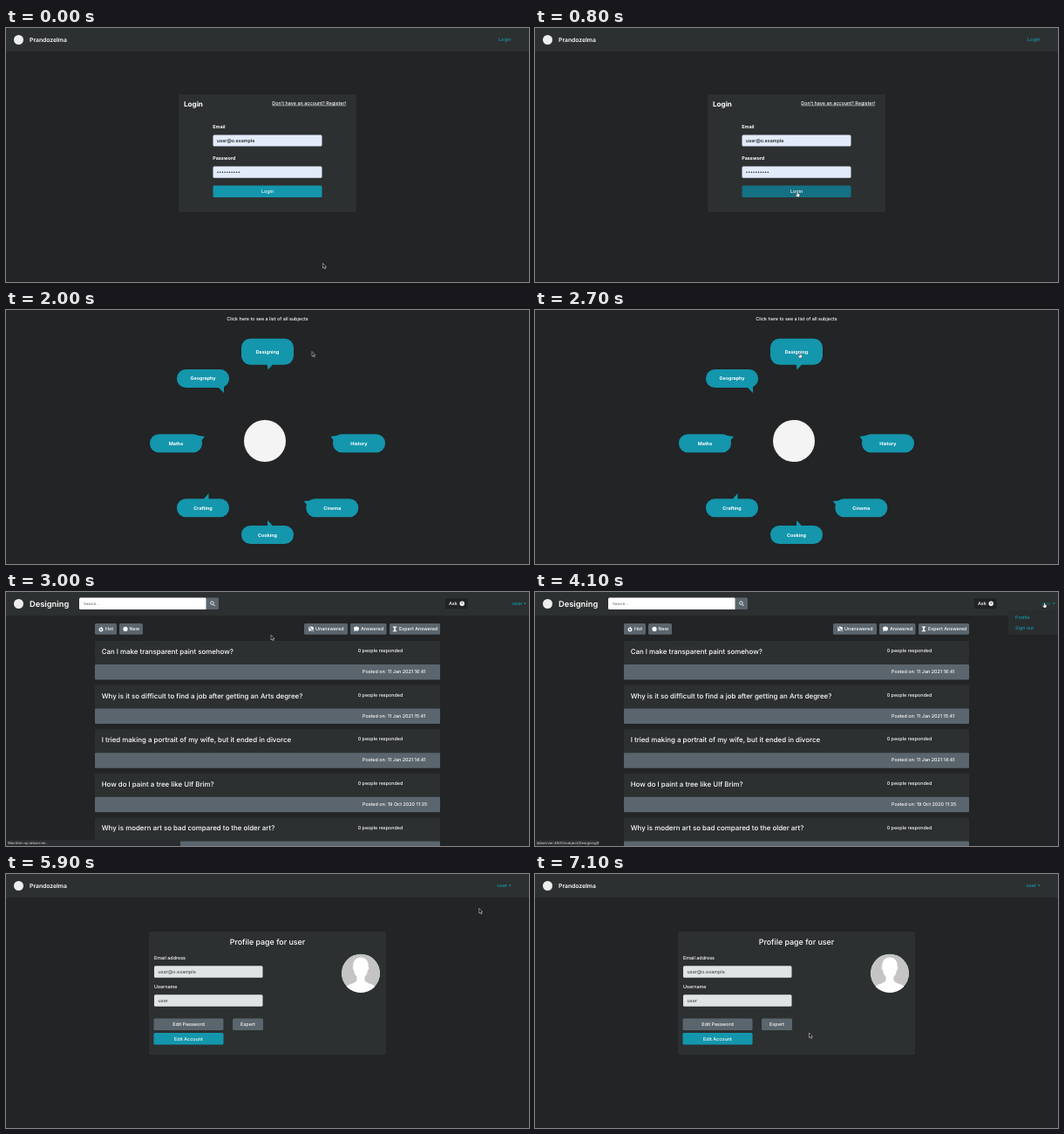
Recreate the animation shown at these times as an HTML page. Size 600 px wide and 291 px high, loop 8000 ms.

```html
<!DOCTYPE html>
<html lang="en">
<head>
<meta charset="utf-8">
<title>Subjects demo</title>
<style>
html, body { margin: 0; width: 100%; height: 100%; overflow: hidden; background: #222425; }
svg { display: block; width: 100vw; height: 100vh; font-family: Inter, "Open Sans", sans-serif; }
text { white-space: pre; font-weight: 500; text-rendering: geometricPrecision; }
</style>
</head>
<body>
<svg id="stage" viewBox="0 0 600 291"></svg>
<script>
const TEAL = '#1496ad', GRAY = '#5b656d', PANEL = '#2c3030', WHITE = '#fff', LINK = '#1398ae';
const MAIL = 'user@o.example', HOST = 'labserver';

// x, vertical centre, string, size, extra attributes
const text = (x, y, s, size = 5.4, extra = '') =>
  `<text x="${x}" y="${y + size * .36}" font-size="${size}" fill="${WHITE}" ${extra}>${s}</text>`;
const rect = (x, y, w, h, fill, r = 0, extra = '') =>
  `<rect x="${x}" y="${y}" width="${w}" height="${h}" rx="${r}" fill="${fill}" ${extra}/>`;
const circle = (x, y, r, fill, extra = '') => `<circle cx="${x}" cy="${y}" r="${r}" fill="${fill}" ${extra}/>`;
const path = (d, fill = WHITE, extra = '') => `<path d="${d}" fill="${fill}" ${extra}/>`;
const group = (id, body) => `<g id="${id}">${body}</g>`;
const bold = 'style="font-weight:700"', mid = 'text-anchor="middle"';
const tint = c => `style="fill:${c}"`;
const button = (x, y, w, h, label, fill, id = '') =>
  rect(x, y, w, h, fill, 1.5, id && `id="${id}"`) + text(x + w / 2, y + h / 2, label, 5.4, mid);

const nav = (title, size) => rect(0, 0, 600, 27, PANEL) + circle(14.5, 13.5, 5.5, '#eee') +
  text(27, 13.4, title, size, 'style="font-weight:600"');
const userMenu = (x, id) => text(x, 13.3, 'user', 5.6, `id="${id}" ${tint(LINK)}`) +
  path(`M${x + 13.3} 12.6h3l-1.5 1.7z`, LINK);

function login() {
  let dots = '';
  for (let i = 0; i < 10; i++) dots += circle(243 + i * 2.7, 165.2, .8, '#222');
  const field = y => rect(237.5, y, 125, 13.2, '#e2ebfa', 1.5);
  return nav('Prandozelma', 6.8) + text(565, 13.5, 'Login', 5.5, tint(LINK)) +
    rect(198, 76, 204, 135, PANEL, 1) + text(204, 86.6, 'Login', 8.1, bold) +
    text(305.3, 85.7, 'Don\'t have an account? Register!', 5.4, 'text-decoration="underline"') +
    text(237.3, 113, 'Email', 5.4, bold) + field(122.4) + text(242, 129, MAIL, 5.4, tint('#111')) +
    text(237.3, 149, 'Password', 5.4, bold) + field(158.5) + dots +
    button(237.5, 180.5, 125, 13.4, 'Login', TEAL, 'submit');
}

function subjects() {
  const bubbles = [
    ['Designing', 300, 47.8, 30, 'M299.5 61H307.5L300.5 68.5z'],
    ['Geography', 226, 78.5, 21, 'M243 88L250 86V95z'],
    ['Maths', 195, 152.7, 21, 'M215 143L228 145L223 151z'],
    ['Crafting', 226, 226.8, 21, 'M225.5 218H232.5V210z'],
    ['Cooking', 300, 257.6, 21, 'M300 249H307.5L300 241z'],
    ['Cinema', 374.3, 226.8, 21, 'M354 218L341.5 219L347 225z'],
    ['History', 405, 152.7, 21, 'M385 143L372.5 145L377 151z']
  ];
  return text(300, 10, 'Click here to see a list of all subjects', 5.4, mid) + circle(297, 150, 24, '#f4f4f4') +
    bubbles.map(([name, x, y, h, tail]) => rect(x - 30, y - h / 2, 60, h, TEAL, 10.3) + path(tail, TEAL) +
      text(x, y, name, 5.4, bold + ' ' + mid)).join('');
}

function questions() {
  const cards = [
    ['Can I make transparent paint somehow?', '11 Jan 2021 16:41'],
    ['Why is it so difficult to find a job after getting an Arts degree?', '11 Jan 2021 15:41'],
    ['I tried making a portrait of my wife, but it ended in divorce', '11 Jan 2021 14:41'],
    ['How do I paint a tree like Ulf Brim?', '19 Oct 2020 11:35'],
    ['Why is modern art so bad compared to the older art?', '19 Oct 2020 10:35']
  ];
  const filters = [[102, 25, 'Hot', 114], [130, 27, 'New', 141.5], [342, 50, 'Unanswered', 355],
    [395, 41.5, 'Answered', 407], [440, 58, 'Expert Answered', 451]];
  const comment = x => path(`M${x - 3} 42c0-3.2 6-3.2 6 0s-3 2.7-4 2.2l-2 1 .7-1.8z`);
  const slash = (color, width) => path('M346.7 39.5l6.6 5.8', 'none', `stroke="${color}" stroke-width="${width}"`);
  const icons = path('M109 39.3c.4 1.5 2.5 2.1 2.5 3.8a2.5 2.4 0 0 1-5 0c0-1 .6-1.6 1-2.1l.7 1z') +
    circle(109, 43.3, 1, GRAY) + circle(137, 42.4, 2.6, WHITE) +
    comment(350) + slash(GRAY, 1.4) + slash(WHITE, .6) + comment(402) +
    path('M443.7 39.5h4.6v.8h-.6l-1.2 2.1 1.2 2.1h.6v.8h-4.6v-.8h.6l1.2-2.1-1.2-2.1h-.6z');
  return nav('Designing', 9.3) +
    rect(84, 6.5, 146, 13.5, WHITE, 1.5) + text(89, 13.5, 'Search...', 4.3, tint('#6c757d')) +
    rect(229.5, 6.5, 14.5, 13.5, GRAY, 1.5) +
    path('M237.8 14.2l1.8 1.8', 'none', 'stroke="#fff" stroke-width="1"') +
    circle(236.4, 12.6, 1.8, 'none', 'stroke="#fff" stroke-width=".8"') +
    rect(503, 6.5, 27.5, 13.5, '#212426', 1.5, 'stroke="#41474b" stroke-width=".4"') +
    text(508, 13.3, 'Ask') + circle(523.2, 13.2, 2.7, WHITE) +
    text(523.2, 13.3, '?', 4.4, `${mid} ${tint('#212426')}`) + userMenu(580.5, 'listUser') +
    filters.map(([x, w, label, tx]) => rect(x, 36, w, 12.7, GRAY, 1.5) + text(tx, 42.5, label)).join('') + icons +
    cards.map(([title, date], i) => `<g transform="translate(0 ${50.6 * i})">` +
      rect(102, 56, 396, 27, PANEL, 1) + rect(102, 83, 396, 17.5, GRAY, 1) +
      text(109.7, 68.2, title, 7.9) + text(403.7, 67.3, '0 people responded') +
      text(409, 91.2, 'Posted on: ' + date) + '</g>').join('') +
    group('menu', rect(543, 21, 57, 28, '#292d2e', 1) + text(551, 29.5, 'Profile', 5.4, tint(LINK)) +
      text(551, 41, 'Sign out', 5.4, tint(LINK)));
}

function profile() {
  const field = y => rect(170, y, 124.5, 13.6, '#e1e4e5', 1.5);
  return nav('Prandozelma', 6.8) + userMenu(563.3, 'profileUser') + rect(164, 66, 272, 141, PANEL, 1) +
    text(300, 77.3, 'Profile page for', 8.9, `id="heading" ${mid}`) +
    text(170, 96, 'Email address') + field(105.2) + text(170, 128.6, 'Username') + field(138.2) +
    group('values', text(174.5, 112.2, MAIL, 5.4, tint('#495057')) + text(174.5, 145, 'user', 5.4, tint('#495057'))) +
    button(169.5, 165.5, 80, 13.5, 'Edit Password', GRAY) + button(260, 165.5, 35, 13.5, 'Expert', GRAY) +
    button(169.5, 182, 80, 13.5, 'Edit Account', TEAL) +
    '<clipPath id="round"><circle cx="407" cy="113.7" r="22.3"/></clipPath><g clip-path="url(#round)">' +
    circle(407, 113.7, 22.3, '#c4c4c4') +
    path('M398.3 106c-1-14 18.4-14 17.4 0c1.2 1 .3 4-.8 4.4c-.5 4-2 6-3.4 7.2v4.5c2 4 11 3.5 13.5 9V138H389V131' +
      'c2.5-5.500 11.500-5 13.500-9v-4.500c-1.400-1.200-2.900-3.200-3.400-7.200c-1.100-.4-2-3.400-.8-4.300z') + '</g>';
}

const cursors =
  group('arrow', path('M0 0V5.6L1.3 4.5 2.2 6.5 3.2 6.1 2.3 4.2H4z', '#111', 'stroke="#eee" stroke-width=".5"')) +
  group('hand', path('M-.6 .3Q0-.5.6.3V2L2.4 2.5V4.200L1.800 5.800H-.8L-2.300 3.500-1.700 2.900-.6 3.600z', WHITE,
    'stroke="#222" stroke-width=".4"'));
const stage = document.getElementById('stage');
stage.innerHTML = rect(0, 0, 600, 291, '#222425') + group('login', login()) + group('subjects', subjects()) +
  group('questions', questions()) + group('profile', profile()) +
  group('status', rect(0, 284, 0, 7, '#2a2d2f', 0, 'id="statusBox"') +
    text(2, 287.5, '', 4.2, `id="statusText" ${tint('#c5c8ca')}`)) + cursors;
const $ = id => document.getElementById(id);
const show = (id, on) => $(id).setAttribute('display', on ? 'inline' : 'none');

// time, x, y of the pointer tip
const route = [
  [0, 363.5, 269.5], [600, 301.3, 187.8], [1600, 301.3, 187.8], [1800, 375, 245], [1900, 440, 150],
  [2000, 351, 47.5], [2100, 250, 55], [2200, 197, 105], [2300, 212, 150], [2400, 262, 90],
  [2500, 304, 49.3], [3100, 304, 49.3], [3900, 584.5, 12.3], [4200, 584.5, 12.3],
  [4500, 561, 28], [5800, 561, 28], [6400, 314.5, 182], [8000, 314.5, 182]
];
const pages = [['login', 0, 900], ['subjects', 900, 2900], ['questions', 2900, 4900], ['profile', 4900, 8000]];
const overLink = [[500, 900], [2500, 2900], [3800, 4900]];
const messages = [
  [2900, 3300, 200, `Wachten op ${HOST}...`],
  [3800, 4400, 74, `${HOST}:4500/subject/Designing#`],
  [4400, 5400, 47, `${HOST}:4500/profile`]
];

function pointer(t) {
  const i = route.findIndex(k => k[0] > t);
  const [t0, x0, y0] = route[i - 1], [t1, x1, y1] = route[i];
  const p = (t - t0) / (t1 - t0), e = p * p * (3 - 2 * p);
  return [x0 + (x1 - x0) * e, y0 + (y1 - y0) * e];
}

const start = performance.now();
function draw() {
  const t = Math.floor((performance.now() - start) % 8000 / 100) * 100;
  const within = (a, b) => t >= a && t < b;
  for (const [id, a, b] of pages) show(id, within(a, b));

  $('submit').setAttribute('fill', t >= 500 ? '#147183' : TEAL);
  show('menu', within(4000, 4900));
  $('listUser').style.fill = within(3800, 4400) ? '#0f6674' : LINK;
  const loaded = t >= 5200;
  $('heading').textContent = 'Profile page for' + (loaded ? ' user' : '');
  show('values', loaded);

  const message = messages.find(([a, b]) => within(a, b));
  show('status', message);
  if (message) {
    $('statusBox').setAttribute('width', message[2]);
    $('statusText').textContent = message[3];
  }

  const hand = overLink.some(([a, b]) => within(a, b));
  show('hand', hand);
  show('arrow', !hand);
  $(hand ? 'hand' : 'arrow').setAttribute('transform', `translate(${pointer(t)})`);
  requestAnimationFrame(draw);
}
draw();
</script>
</body>
</html>
```
